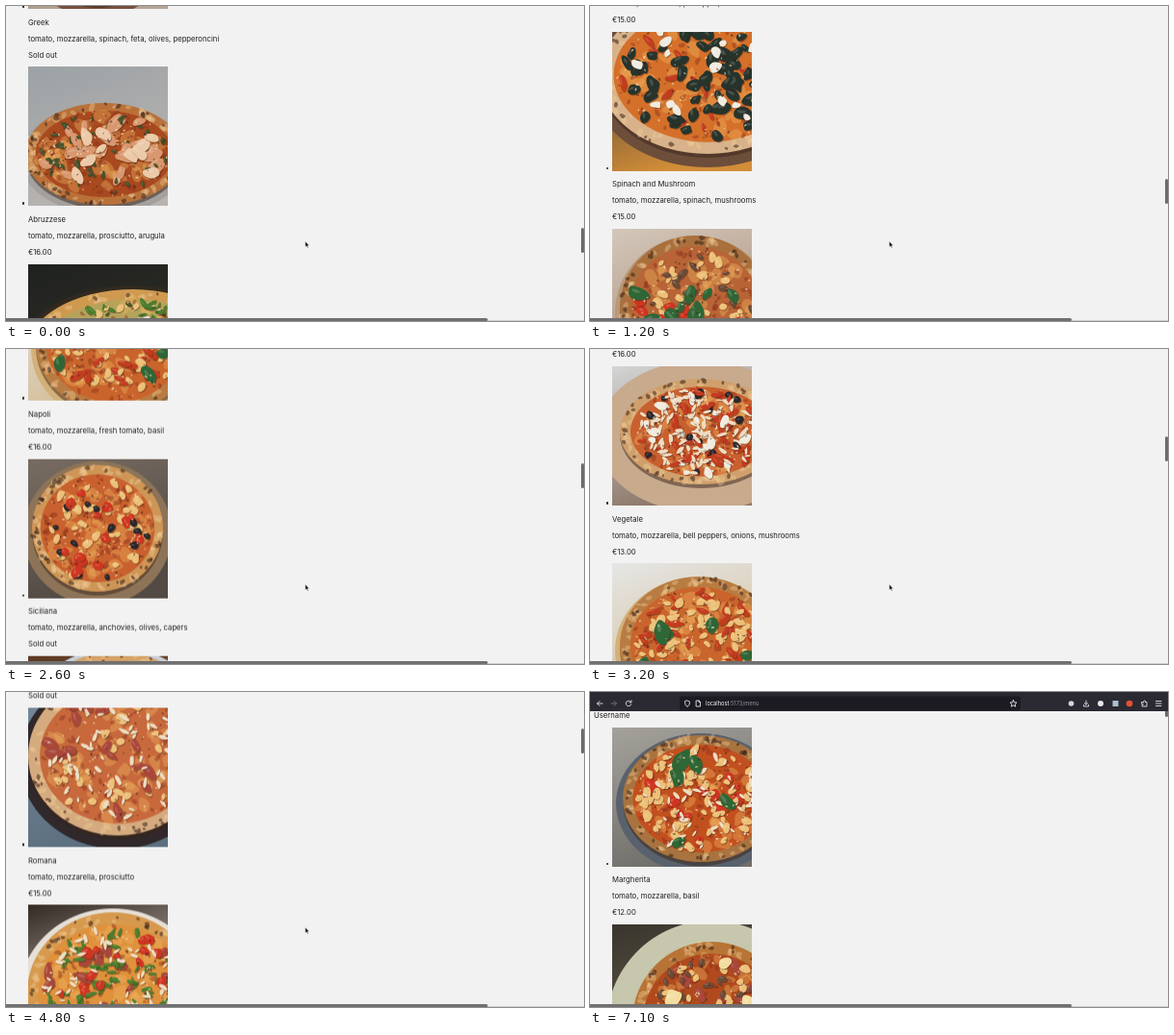
Write an HTML page with a canvas that moves like this. It is 600 by 328 pixels and loops after 7.2 s.

```html
<!DOCTYPE html>
<html lang="en">
<head>
<meta charset="utf-8">
<title>Pizza menu</title>
<style>
  html, body { margin: 0; width: 100%; height: 100%; overflow: hidden; background: #f2f2f2; }
  #stage { position: relative; width: 600px; height: 328px; overflow: hidden;
    background: #f2f2f2; color: #202020; font: 7.73px/10px Inter, sans-serif; }
  #stage > *, #page *, li > * { position: absolute; }
  #page { left: 0; top: 0; width: 600px; will-change: transform; }
  #page > span, #page > a { left: 3.9px; white-space: nowrap; }
  #page > a { top: 3.3px; color: #2f2a3c; text-decoration: underline; }
  #page > span { top: 20px; }
  ul { margin: 0; padding: 0; list-style: none; left: 23px; top: 36.5px; }
  li { left: 0; width: 300px; height: 205px; }
  li::before { content: ""; position: absolute; left: -6.5px; top: 141px;
    width: 2.6px; height: 2.6px; border-radius: 50%; background: #202020; }
  canvas { left: 0; top: 0; width: 145px; height: 145px; }
  li p { margin: 0; left: 0; white-space: nowrap; }
  #line { left: 0; top: 327px; width: 600px; height: 1px; background: #d2d2d2; }
  #across { left: 0; top: 324.6px; width: 500px; height: 3.4px; border-radius: 0 2px 2px 0; background: #707070; }
  #thumb { left: 597px; width: 3px; border-radius: 1.5px; background: #6c6c6c; }
  svg { left: 0; top: 0; }
</style>
</head>
<body>
<div id="stage">
  <div id="page">
    <a>Keen Tovel Pizza Co.</a>
    <span>Username</span>
    <ul id="menu"></ul>
  </div>
  <div id="line"></div>
  <div id="across"></div>
  <div id="thumb"></div>
  <svg id="bar" width="600" height="20" fill="none" stroke="#e4e4ea" stroke-width=".9" stroke-linecap="round" stroke-linejoin="round">
    <rect width="600" height="20" fill="#2b2a33" stroke="none"/>
    <rect x="93" y="4.5" width="354" height="14.5" rx="2" fill="#1c1b22" stroke="none"/>
    <path d="M13 12H7.5M10 9.5L7.5 12L10 14.5"/>
    <path d="M22 12H27.5M25 9.5L27.5 12L25 14.5" stroke="#77767f"/>
    <path d="M42.5 10.5A2.8 2.8 0 1 0 42.8 12.8M43 8.8V10.8H41"/>
    <path d="M101 9L103.5 10C103.5 13 102.5 14.5 101 15.3C99.5 14.5 98.5 13 98.5 10Z"/>
    <path d="M110.5 9H113L114.5 10.5V15H110.5ZM113 9V10.5H114.5"/>
    <path d="M439.5 8.5L440.5 10.8L443 11L441.1 12.7L441.7 15.2L439.5 13.9L437.3 15.2L437.9 12.7L436 11L438.5 10.8Z"/>
    <path d="M515 9V13M513.3 11.5L515 13.2L516.7 11.5M512.5 13.5V15H517.5V13.5"/>
    <path d="M573 10.5H575C574.5 8.3 577 8.3 576.5 10.5H578V15H573V13.3C575 13.6 575 11.8 573 12.2Z"/>
    <path d="M587.5 9.5H593M587.5 12H593M587.5 14.5H593"/>
    <g stroke="none">
      <circle cx="499.5" cy="12" r="2.8" fill="#d5d5dc"/>
      <circle cx="530" cy="12" r="3" fill="#e8e8ea"/>
      <rect x="542.5" y="9" width="6" height="6" fill="#a9c0cc"/>
      <circle cx="560" cy="12" r="3.3" fill="#e5532d"/>
      <text x="120" y="14.1" font-family="Inter, sans-serif" font-size="5.7" fill="#fbfbfe">localhost<tspan fill="#96959e">:5173/menu</tspan></text>
    </g>
  </svg>
  <svg id="cursor" width="8" height="10" viewBox="-1 -1 8 10">
    <path d="M0 0V6L1.4 4.8L2.4 7L3.4 6.5L2.4 4.5H4.2Z" fill="#000" stroke="#fff" stroke-width=".5"/>
  </svg>
</div>
<script>
const $ = id => document.getElementById(id);
const LOOP = 7200, STEP = 100, PITCH = 205.3, SIDE = 145;

// Topping: colour, how many, size, length to width
const toppings = {
  basil: ['#2f6636', 6, 11, 1.6],
  arugula: ['#4c7d2c', 95, 6, 2.8],
  herbs: ['#48522a', 26, 4.5, 2],
  spinach: ['#27342c', 62, 9, 1.5],
  cheese: ['#ecc078', 36, 5.5, 1.5],
  feta: ['#f0ebe0', 20, 6, 1.4],
  cream: ['#f3dda0', 6, 12, 1.3],
  shreds: ['#efdcc0', 60, 5, 2.6],
  tomato: ['#cf3520', 13, 6.5, 1.2],
  pepper: ['#c23c1e', 20, 8, 2.4],
  salami: ['#86301f', 12, 8, 1],
  olive: ['#2b262b', 13, 5, 1.2],
  mushroom: ['#6b4a36', 24, 5.5, 1.7],
  ham: ['#a9483a', 18, 10, 1.9],
  prosciutto: ['#d8976f', 20, 11, 1.8],
  slices: ['#ecc9a8', 10, 9, 1.6],
  pineapple: ['#efcc5c', 42, 4.5, 1.1],
  bacon: ['#a14f29', 28, 4, 1.8]
};

// Name, price (0 = sold out), extras, backdrop, tray, tray rim, pie [x, y, rx, ry], crust, sauce, toppings
const menu = [
  ['Margherita', 12, 'basil', '#a5a29c #716f6b', '#59626c', 7, [92, 74, 81, 66], '#a8733f', '#c2501f', 'tomato cheese shreds cheese basil'],
  ['Capricciosa', 0, 'mushrooms, ham, artichoke', '#39352d #6b6450', '#c6c7ad', 27, [103, 101, 82, 83], '#b87436', '#b04a1e', 'ham mushroom cheese mushroom cream'],
  ['Romana', 15, 'prosciutto', '#738799 #5c7080', '#30282a', 9, [93, 50, 93, 83], '#d4aa7e', '#c7693c', 'cheese ham shreds'],
  ['Prosciutto e Rucola', 16, 'prosciutto, arugula', '#352b25 #d5cec4', '#e5dfd7', 9, [88, 92, 89, 84], '#d6994d', '#df913c', 'tomato ham arugula tomato shreds'],
  ['Diavola', 16, 'spicy salami, chili flakes', '#4a3a30 #72604e', '#a98a68', 9, [75, 72, 70, 68], '#c88c50', '#c75525', 'cheese salami pepper'],
  ['Vegetale', 13, 'bell peppers, onions, mushrooms', '#d3d5d5 #8d7768', '#c8aa8d', 24, [92, 68, 84, 55], '#d0a06c', '#c9602f', 'shreds pepper feta olive pepper shreds'],
  ['Napoli', 16, 'fresh tomato, basil', '#e5e6e5 #d5c09c', '#d3b078', 5, [90, 86, 82, 72], '#b87c42', '#c9652c', 'cheese pepper cheese pepper basil'],
  ['Siciliana', 0, 'anchovies, olives, capers', '#786c62 #534a44', '#8d7458', 9, [72, 72, 68, 66], '#cd9556', '#c8612e', 'cheese olive tomato'],
  ['Pepperoni', 14, 'pepperoni', '#5d3a23 #845431', '#c8d0d9', 9, [92, 63, 84, 68], '#d5a368', '#cf823f', 'shreds mushroom salami olive'],
  ['Hawaii', 15, 'pineapple, bacon', '#6e675f #28302b', '#b59a80', 9, [90, 88, 88, 82], '#d59d53', '#d4842f', 'cheese bacon pineapple'],
  ['Spinach and Mushroom', 15, 'spinach, mushrooms', '#34373a #d28d37', '#6c4e3b', 9, [99, 45, 112, 82], '#d8b28a', '#d4702a', 'pepper spinach feta'],
  ['Mediterranean', 16, 'sun-dried tomatoes, olives, artichoke', '#d3c8bb #ad8f7a', '#b99878', 5, [86, 82, 78, 75], '#a9703d', '#b86436', 'cheese mushroom tomato basil basil'],
  ['Greek', 0, 'spinach, feta, olives, pepperoncini', '#8a6a58 #b5a595', '#77513c', 9, [72, 72, 70, 68], '#cd9357', '#c9693a', 'spinach feta olive'],
  ['Abruzzese', 16, 'prosciutto, arugula', '#9ca2a6 #b9b4b1', '#a3a09e', 5, [79, 91, 82, 53], '#b97139', '#a8491f', 'herbs prosciutto herbs slices'],
  ['Pesto', 16, 'pesto, pine nuts', '#20221f #30302a', '#31291f', 9, [108, 95, 112, 69], '#cf9950', '#b5a35a', 'herbs feta arugula feta cheese']
];

function seeded(n) {
  let s = n * 7919 + 17;
  return () => (s = (s * 16807) % 2147483647) / 2147483647;
}

function drawPhoto(canvas, seed, backdrop, tray, rim, [x, y, rx, ry], crust, sauce, bits) {
  const g = canvas.getContext('2d'), rand = seeded(seed + 1);
  canvas.width = canvas.height = SIDE * 2;
  g.scale(2, 2);
  const oval = (cx, cy, a, b, fill) => {
    g.fillStyle = fill;
    g.beginPath();
    g.ellipse(cx, cy, a, b, 0, 0, Math.PI * 2);
    g.fill();
  };
  // Soft uneven outline through jittered points around an ellipse
  const blob = (a, b, turn) => {
    const n = 8, shape = new Path2D();
    const pts = Array.from({ length: n }, (_, i) => {
      const r = 0.7 + rand() * 0.55, w = i / n * Math.PI * 2;
      const px = a * r * Math.cos(w), py = b * r * Math.sin(w);
      return [px * Math.cos(turn) - py * Math.sin(turn), px * Math.sin(turn) + py * Math.cos(turn)];
    });
    for (let i = 0; i <= n; i++) {
      const [px, py] = pts[i % n], [qx, qy] = pts[(i + 1) % n];
      const mx = (px + qx) / 2, my = (py + qy) / 2;
      if (i) shape.quadraticCurveTo(px, py, mx, my);
      else shape.moveTo(mx, my);
    }
    return shape;
  };
  const stamp = (shape, cx, cy, fill) => {
    g.save();
    g.translate(cx, cy);
    g.fillStyle = fill;
    g.fill(shape);
    g.restore();
  };
  const spot = (min, max) => {
    const a = rand() * Math.PI * 2, r = Math.sqrt(min * min + rand() * (max * max - min * min));
    return [x + rx * r * Math.cos(a), y + ry * r * Math.sin(a)];
  };
  const scatter = (count, min, max, size, ratio, fill) => {
    for (let i = 0; i < count; i++) {
      const s = size * (0.6 + rand() * 0.6);
      stamp(blob(s, s / ratio, rand() * Math.PI), ...spot(min, max), fill);
    }
  };

  const [from, to] = backdrop.split(' ');
  const shade = g.createLinearGradient(0, 0, 50, SIDE);
  shade.addColorStop(0, from);
  shade.addColorStop(1, to);
  g.fillStyle = shade;
  g.fillRect(0, 0, SIDE, SIDE);
  oval(x, y + 5, rx + rim, ry + rim, tray);
  oval(x, y + 3, rx, ry + 1, '#3a241980');
  oval(x, y, rx, ry, crust);
  scatter(60, 0.87, 0.97, 5, 1.8, '#f1cf9a60');
  scatter(40, 0.9, 0.99, 3, 1.4, '#3d231a90');
  oval(x, y, rx * 0.87, ry * 0.85, sauce);
  scatter(45, 0, 0.8, 9, 1.5, '#efb56160');
  scatter(70, 0, 0.84, 4, 1.7, '#8b2d1b70');

  for (const bit of bits.split(' ')) {
    const [fill, count, size, ratio] = toppings[bit];
    for (let i = 0; i < count; i++) {
      const [cx, cy] = spot(0, 0.8), s = size * (0.65 + rand() * 0.6), turn = rand() * Math.PI;
      const shape = blob(s, s / ratio, turn);
      stamp(shape, cx + 0.7, cy + 1, '#32180c60');
      stamp(shape, cx, cy, fill);
      stamp(blob(s * 0.45, s * 0.25 / ratio, turn), cx - s * 0.2, cy - s * 0.2, '#ffffff28');
    }
  }
  scatter(70, 0, 0.84, 1.6, 1.8, '#f8e4bcb0');
  scatter(60, 0, 0.84, 1.5, 1.5, '#3c1c1480');
}

menu.forEach(([name, price, extras, ...photo], i) => {
  const item = document.createElement('li');
  item.style.top = i * PITCH + 'px';
  const canvas = item.appendChild(document.createElement('canvas'));
  drawPhoto(canvas, i, ...photo);
  const lines = [name, 'tomato, mozzarella, ' + extras, price ? `€${price}.00` : 'Sold out'];
  lines.forEach((text, k) => {
    const p = item.appendChild(document.createElement('p'));
    p.textContent = text;
    p.style.top = 154.9 + k * 16.9 + 'px';
  });
  $('menu').append(item);
});

// Scroll offset over time, joined by a monotone cubic
const path = [[0, 2642], [1200, 2063], [2100, 1633], [3200, 1045], [4800, 430.6], [5600, -5], [5800, -4], [6400, 0], [LOOP, 0]];
const secant = i => (path[i + 1][1] - path[i][1]) / (path[i + 1][0] - path[i][0]);
const slopes = path.map((_, i) => {
  if (i === 0) return secant(0);
  if (i === path.length - 1) return 0;
  const a = secant(i - 1), b = secant(i);
  return a * b > 0 ? 2 * a * b / (a + b) : 0;
});

function scrollAt(t) {
  const i = path.findIndex((_, k) => t < path[k + 1][0]);
  const [t0, a] = path[i], [t1, b] = path[i + 1];
  const d = t1 - t0, u = (t - t0) / d, v = 1 - u;
  return v * v * ((1 + 2 * u) * a + u * d * slopes[i])
    + u * u * ((1 + 2 * v) * b - v * d * slopes[i + 1]);
}

function ease(t, from, to) {
  const u = Math.min(1, Math.max(0, (t - from) / (to - from)));
  return u * u * (3 - 2 * u);
}

function render(t) {
  const y = scrollAt(t);
  $('page').style.transform = `translateY(${-y}px)`;
  $('thumb').style.top = Math.max(0, y * 0.0874) + 'px';
  $('thumb').style.height = 26 + Math.min(0, y) / 4 + 'px';
  $('bar').style.transform = `translateY(${-20 * (1 - ease(t, 6600, 7000))}px)`;
  $('cursor').style.transform = `translate(309.6px, ${244 - 256 * ease(t, 6400, 6900)}px)`;
}

const start = performance.now();
function tick() {
  const t = (performance.now() - start) % LOOP;
  render(Math.floor(t / STEP) * STEP);
  requestAnimationFrame(tick);
}
tick();
</script>
</body>
</html>
```
